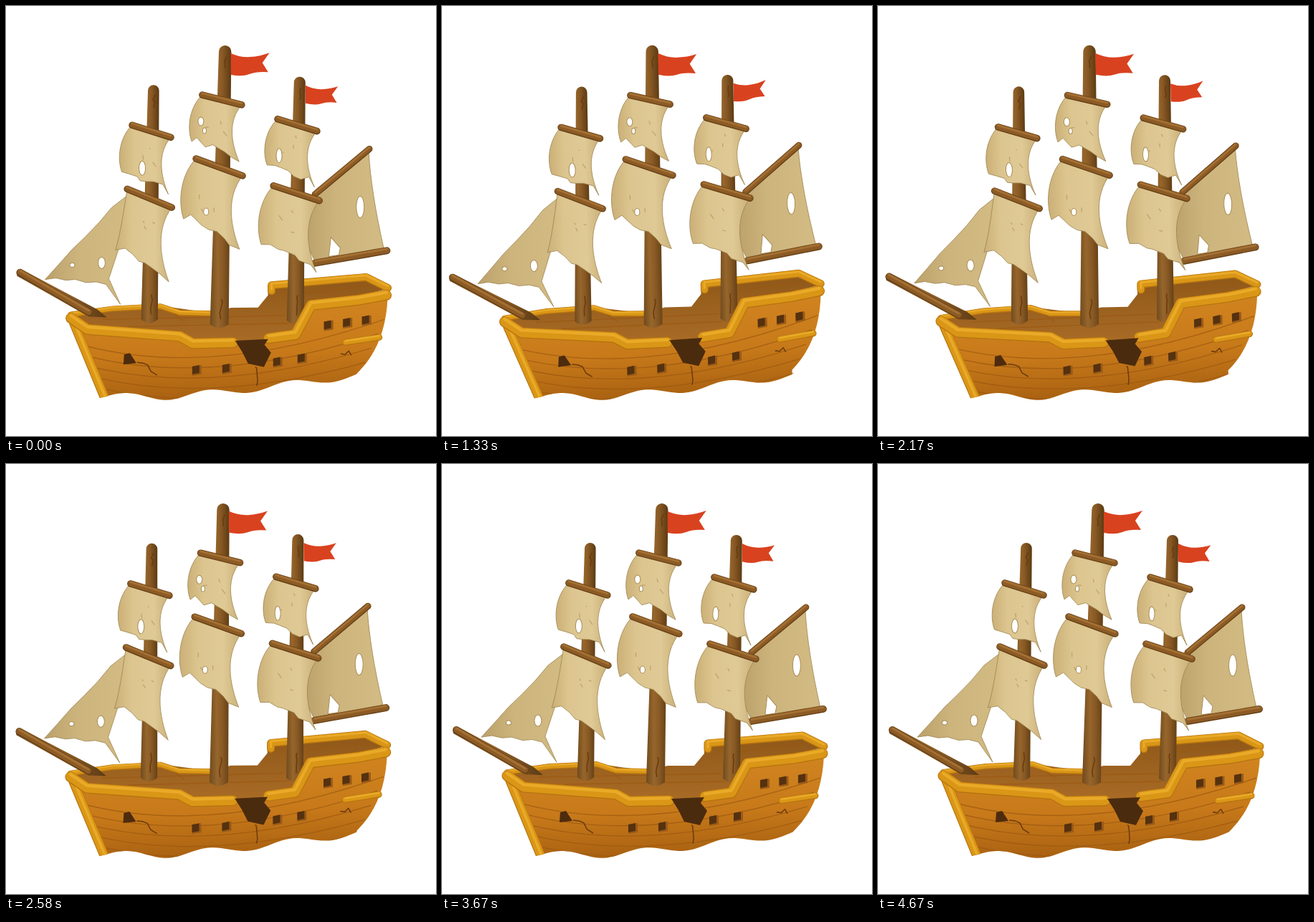
These frames come from a looping animation (600 px wide and 600 px high, 4.75 s). An HTML page:

```html
<!DOCTYPE html>
<html lang="en">
<head>
<meta charset="utf-8">
<title>Old sailing ship</title>
<style>
  html, body { margin: 0; width: 100%; height: 100%; overflow: hidden; background: #fff; }
  svg { display: block; width: 100vw; height: 100vh; }
  path { stroke-linejoin: round; }
  .sail { stroke: #9c844e; stroke-width: .8; }
  .hole { fill: #fff; stroke: #a98d55; }
  .wear { fill: none; stroke: #9a7d47; stroke-width: 1.2; opacity: .5; }
  .plank { fill: none; stroke: #9a5710; stroke-width: 1.4; opacity: .7; }
  .crack { fill: none; stroke: #6b3a0c; stroke-width: 1.5; }
</style>
</head>
<body>
<svg viewBox="0 0 600 600">
  <defs>
    <linearGradient id="cloth">
      <stop offset="0" stop-color="#cbb077"/><stop offset=".3" stop-color="#dcc58f"/>
      <stop offset=".7" stop-color="#dfc995"/><stop offset="1" stop-color="#c9ae76"/>
    </linearGradient>
    <linearGradient id="back">
      <stop offset="0" stop-color="#bba069"/><stop offset=".4" stop-color="#cdb47d"/>
      <stop offset="1" stop-color="#d3bb84"/>
    </linearGradient>
    <linearGradient id="wood">
      <stop offset="0" stop-color="#704a1d"/><stop offset=".35" stop-color="#96662c"/>
      <stop offset=".6" stop-color="#885924"/><stop offset="1" stop-color="#5b3a13"/>
    </linearGradient>
    <linearGradient id="hull" x2=".1" y2="1">
      <stop offset="0" stop-color="#d28620"/><stop offset=".55" stop-color="#c87a1a"/>
      <stop offset="1" stop-color="#a55e10"/>
    </linearGradient>
    <linearGradient id="deck" x2="0" y2="1">
      <stop offset="0" stop-color="#8e5718"/><stop offset="1" stop-color="#ac6e28"/>
    </linearGradient>
    <clipPath id="water"><path id="swell"/></clipPath>
  </defs>
  <g clip-path="url(#water)"><g id="ship"></g></g>
</svg>
<script>
const byId = id => document.getElementById(id);
const ship = byId('ship');

let seed = 7;
const rand = () => (seed = seed * 16807 % 2147483647) / 2147483647;

const path = (d, fill, cls = '') => `<path d="${d}" fill="${fill}" class="${cls}"/>`;
const line = (d, cls) => `<path d="${d}" class="${cls}"/>`;
const hole = (x, y, rx, ry) => `<ellipse cx="${x}" cy="${y}" rx="${rx}" ry="${ry}" class="hole"/>`;

// Ragged edge from a to b, bitten upwards by up to depth
function torn([ax, ay], [bx, by], n, depth) {
  let d = '';
  for (let i = 1; i < n; i++) {
    const x = ax + (bx - ax) * i / n + (rand() - .5) * depth * .6;
    const y = ay + (by - ay) * i / n - rand() * depth;
    d += `L${x} ${y}`;
  }
  return d + `L${bx} ${by}`;
}
const crack = (a, b) => line(`M${a}` + torn(a, b, 4, 6), 'crack');

// Rounded beam: dark edge, body and a highlight along the top
const beam = (d, w, [edge, body, light]) =>
  [[w, edge, 0], [w - 2, body, -.4], [w * .28, light, -w * .24]].map(([sw, color, dy]) =>
    `<path d="${d}" fill="none" stroke="${color}" stroke-width="${sw}" stroke-linecap="round" transform="translate(0 ${dy})"/>`).join('');
const spar = (d, w) => beam(d, w, ['#664016', '#8c5b25', '#a47033']);
const rim = (d, w) => beam(d, w, ['#b67410', '#da9616', '#e9aa28']);

function mast(x, top, foot, bottom, r) {
  const R = r * 1.5;
  return path(`M${x - r} ${top + r}A${r} ${r} 0 0 1 ${x + r} ${top + r}L${foot + R} ${bottom - 3}` +
    `Q${foot} ${bottom + 7} ${foot - R} ${bottom - 3}Z`, 'url(#wood)') +
    crack([x + 1, top + 15], [x, top + 32]) + crack([foot + 3, bottom - 38], [foot + 2, bottom - 10]);
}

// Square sail hanging from a yard that starts at x, y and spans w, dy
function sail(x, y, w, dy, h, belly = .32) {
  const bx = x + w, by = y + dy;
  const left = [x - .27 * w, y + h], right = [bx - .07 * w, by + 1.22 * h];
  const cloth = `M${bx} ${by}C${bx - .36 * w} ${by + .35 * h} ${right[0] - .2 * w} ${right[1] - .4 * h} ${right}` +
    torn(right, left, 7, h * .16) +
    `C${x - (belly + .08) * w} ${y + .7 * h} ${x - belly * w} ${y + .25 * h} ${x} ${y}Z`;
  let marks = '';
  for (let i = 0; i < 3; i++) marks += `M${x + w * .6 * rand()} ${y + h * (.35 + .5 * rand())}l${5 * rand()} ${7 * rand()}`;
  return path(cloth, 'url(#cloth)', 'sail') + line(marks, 'wear') + spar(`M${x} ${y}L${bx} ${by}`, 9.5);
}

const flag = (id, x, y, size) => `<g id="${id}"><path transform="translate(${x} ${y}) scale(${size})" fill="#d9421f"
  d="M0 0Q13 6 27 5T54-1L44 13 52 26Q36 25 26 29T0 30Z"/></g>`;

function ports(x, y, dx, dy, n) {
  let out = '';
  for (let i = 0; i < n; i++, x += dx, y += dy)
    out += path(`M${x} ${y}l13-2v13l-13 2z`, '#9a5a17') + path(`M${x} ${y}l10-2v11l-10 2z`, '#55310f');
  return out;
}

function planks() {
  let d = '';
  for (let i = 0; i < 5; i++)
    d += `M${112 + 6 * i} ${474 + 15 * i}Q290 ${520 + 12 * i} ${528 - 9 * i} ${438 + 20 * i}`;
  return line(d, 'plank');
}

const backSails =
  path('M173 262' + torn([168, 264], [55, 381], 6, 3) + torn([55, 381], [140, 388], 6, 5) +
    'L160 416 144 380 158 338 168 315Z', 'url(#back)', 'sail') +
  hole(134, 358, 5, 8) + hole(93, 361, 3.5, 3) +
  path('M507 203Q510 260 528 340L433 359Q405 310 428 268Z', 'url(#back)', 'sail') +
  hole(495, 281, 5.5, 15) + path('M454 323L467 338 465 348 451 350Z', '#fff', 'hole') +
  spar('M432 263L508 200', 9) + spar('M432 359L532 342', 10);

const deck =
  path('M90 432L216 418 284 428 315 421 352 421 366 404 366 392 503 378 535 395 426 420 404 462 364 472 320 480 250 470 112 455Z', 'url(#deck)') +
  line('M135 437L390 432M170 447L395 443M225 422L250 440M400 403L505 391', 'plank') +
  rim('M91 430L150 422 216 419 243 428 284 429', 8) +
  rim('M371 398V390L503 379 533 394', 11);

const masts = mast(207, 110, 200.5, 440, 7.8) + mast(307, 55, 298, 447, 8.7) + mast(411, 99, 404, 442, 8);
const flags = flag('flagA', 315, 66, 1) + flag('flagB', 419, 111, .84);

const sails =
  sail(170, 255, 62, 26, 85, .06) +
  sail(177, 166, 54, 17, 65) + hole(191, 226, 4.5, 10) +
  sail(266, 213, 65, 24, 84) + hole(280, 287, 3.5, 5) +
  sail(275, 124, 55, 14, 65) + hole(273, 161, 4, 6) + hole(278, 174, 2.5, 4) +
  sail(374, 251, 64, 21, 82) +
  sail(380, 158, 55, 17, 64) + hole(382, 209, 4, 10);

const hull =
  path('M88 438L114 452 243 462 261 472 320 474 366 466 404 460 426 420 533 407Q530 475 490 513V560H141L137 543Z', 'url(#hull)') +
  planks() +
  rim('M95 442L140 552', 13) +
  rim('M91 435L114 451 243 461 261 471 317 470', 15) +
  rim('M367 464L404 459 426 418 492 411 531 404', 15) +
  rim('M474 470L521 463', 9) +
  path('M320 467L366 465 361 473 370 484 360 504 338 499 330 483Z', '#4b2b0e') +
  path('M164 500L165 486 173 484 182 498Z', '#4d2b0d') +
  crack([348, 504], [350, 530]) + crack([183, 497], [211, 515]) + crack([467, 486], [482, 488]) +
  ports(260, 503, 42, -2, 2) + ports(373, 492, 34, -5, 2) + ports(444, 441, 26.5, -3.5, 3);

const bowsprit = path('M21 366L128 423 141 434 116 433 16 376Q13 367 21 366Z', 'url(#wood)') +
  spar('M20 371L116 427', 10);

ship.innerHTML = backSails + deck + masts + flags + sails + hull + bowsprit;

// The sea hides the keel behind a rising scalloped line
let swell = 'M0 0H600';
for (let x = 600; x >= 130; x -= 5) {
  const rise = 30 * Math.max(0, (x - 220) / 270) ** 1.3;
  swell += `L${x} ${545 - rise + 5 * Math.cos(2 * Math.PI * (x - 225) / 115)}`;
}
byId('swell').setAttribute('d', swell + 'H0Z');

const skewAt = (x, deg) => `translate(${x}) skewY(${deg}) translate(${-x})`;

const STEP = 1000 / 12, LOOP = 4750, ROCK = 950;

function draw(now) {
  const time = Math.floor((now % LOOP + 4) / STEP) * STEP;
  const lean = 1 - Math.cos(2 * Math.PI * (time / ROCK - .9)); // 0 right, 2 left
  ship.setAttribute('transform', `rotate(${-.79 * lean} 295 565)`);
  byId('flagA').setAttribute('transform', skewAt(315, 2.1 * lean));
  byId('flagB').setAttribute('transform', skewAt(419, 4 - 3.6 * lean));
}

const start = performance.now();
function tick() {
  draw(performance.now() - start);
  requestAnimationFrame(tick);
}
tick();
</script>
</body>
</html>
```
